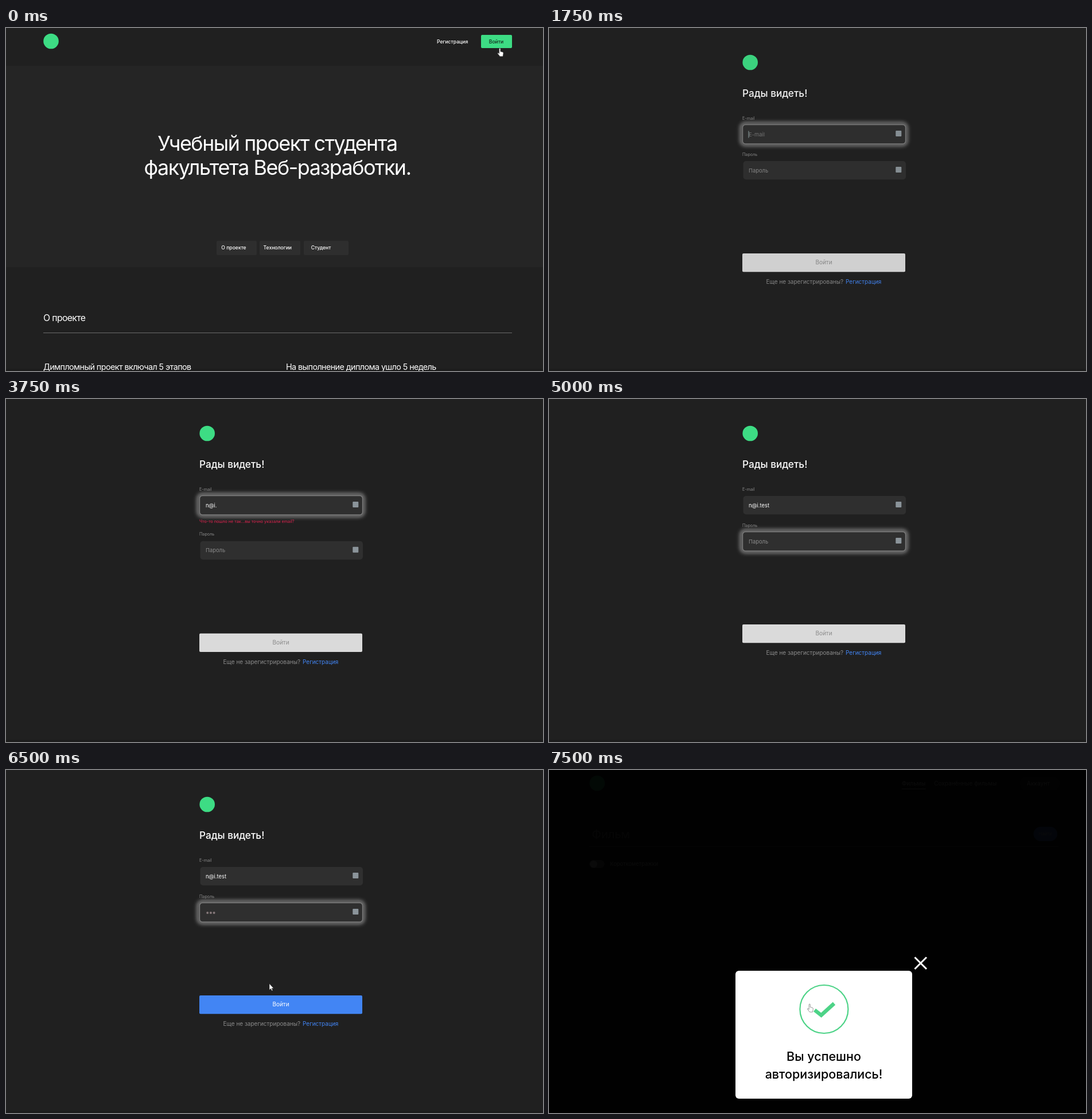
These frames come from a looping animation (936x598 px, 8 s). An HTML page:

```html
<!DOCTYPE html>
<html lang="ru">
<head>
<meta charset="utf-8">
<title>Вход на сайт</title>
<style>
  html, body { margin: 0; width: 100%; height: 100%; overflow: hidden; background: #202020; }
  svg { display: block; width: 936px; height: 598px; }
  text { font-family: Inter, Roboto, sans-serif; fill: #fff; white-space: pre; }
  .mid { text-anchor: middle; }
  .medium { font-weight: 500; }
  .tight { letter-spacing: -.04em; }
  .small { font-size: 8.6px; font-weight: 500; }
  .hero { font-size: 35.85px; }
  .label { font-size: 7.2px; fill: #8b8b8b; }
  .input { font-size: 9.4px; }
  .body { font-size: 10px; }
  .grey { fill: #8b8b8b; }
  .blue { fill: #4285f4; }
  .green { fill: #3ddc84; }
  .field { fill: #2f2f2f; }
  .icon { fill: #8b949a; }
</style>
</head>
<body>
<svg viewBox="0 0 936 598" xmlns="http://www.w3.org/2000/svg">
  <defs>
    <filter id="blur" x="-10%" y="-60%" width="120%" height="220%"><feGaussianBlur stdDeviation="3"/></filter>
  </defs>
  <rect width="936" height="598" fill="#202020"/>
  <rect y="594" width="936" height="4" fill="#1c1c1c"/>

  <g id="landing">
    <rect y="66" width="936" height="351" fill="#252525"/>
    <circle class="green" cx="78.5" cy="23" r="13.3"/>
    <text class="small" x="751" y="26.5">Регистрация</text>
    <rect class="green" x="828" y="12" width="54" height="23" rx="2"/>
    <text class="small mid" x="854.5" y="26.5" style="fill:#14281c">Войти</text>
    <text class="hero tight mid" x="473" y="214">Учебный проект студента</text>
    <text class="hero tight mid" x="473" y="255.6">факультета Веб-разработки.</text>
    <g fill="#2e2e2e">
      <rect x="367" y="371" width="70" height="25" rx="2"/>
      <rect x="442" y="371" width="71" height="25" rx="2"/>
      <rect x="519" y="371" width="78" height="25" rx="2"/>
    </g>
    <text class="small mid" x="397" y="385.5">О проекте</text>
    <text class="small mid" x="473.3" y="385.5">Технологии</text>
    <text class="small mid" x="549" y="385.5">Студент</text>
    <text class="tight" x="65" y="511.3" font-size="15.8">О проекте</text>
    <rect x="65" y="531" width="817" height="1" fill="#6b6b6b"/>
    <g class="tight" font-size="14.35">
      <text x="65" y="596">Димпломный проект включал 5 этапов</text>
      <text x="488" y="596">На выполнение диплома ушло 5 недель</text>
    </g>
  </g>

  <g id="login">
    <circle class="green" cx="350.7" cy="60" r="13.3"/>
    <text class="medium" x="337" y="120.3" font-size="17.2">Рады видеть!</text>
    <text class="label" x="337" y="159.7">E-mail</text>
    <rect class="field" x="338.5" y="169" width="283.5" height="32.3" rx="5"/>
    <text id="error" class="label medium" x="337" y="215.5" style="fill:#c8234a">Что-то пошло не так...вы точно указали email?</text>
    <g id="lower">
      <text class="label" x="337" y="222.7">Пароль</text>
      <rect class="field" x="338.5" y="232" width="283.5" height="32.3" rx="5"/>
      <rect id="submit" x="337" y="393" width="284" height="32.3" rx="2"/>
      <text id="submitText" class="body mid" x="479" y="412">Войти</text>
      <text class="body grey" x="378.5" y="446.3">Еще не зарегистрированы?</text>
      <text class="body blue" x="517" y="446.3">Регистрация</text>
    </g>
    <g id="focus">
      <rect x="335" y="166.5" width="288" height="37" rx="7" fill="none" stroke="#8c8c8c" stroke-width="5" filter="url(#blur)"/>
      <rect x="337.5" y="168.5" width="284" height="33.5" rx="5" fill="#2f2f2f" stroke="#7d7d7d" stroke-width="1.3"/>
    </g>
    <text id="email" class="input" x="348" y="188.7"></text>
    <rect class="icon" x="604.3" y="179" width="10" height="10" rx="1"/>
    <rect id="caret" x="347.5" y="179.5" width="1" height="12" fill="#8fa6a6"/>
    <g id="passwordContent">
      <text id="password" class="input grey" x="348" y="251.7">Пароль</text>
      <g id="dots" fill="#85787a"></g>
      <rect class="icon" x="604.3" y="242" width="10" height="10" rx="1"/>
    </g>
  </g>

  <g id="films">
    <circle class="green" cx="84" cy="23" r="13.3"/>
    <text class="body medium" x="615" y="27">Фильмы</text>
    <rect x="615" y="32.3" width="41.5" height="1.3" fill="#fff"/>
    <text class="body" x="671.3" y="27">Сохранённые фильмы</text>
    <rect x="821" y="12" width="69" height="23" rx="11.5" fill="#303030"/>
    <text class="body medium mid" x="853" y="27">Аккаунт</text>
    <text class="grey" x="74.5" y="119.3" font-size="20">Фильм</text>
    <rect class="blue" x="844.5" y="99" width="41.5" height="25" rx="12.5"/>
    <text class="mid" x="865" y="114.2" font-size="7.9">Найти</text>
    <rect x="70" y="133" width="818" height="1" fill="#757575"/>
    <rect x="70.5" y="157" width="26" height="14" rx="7" fill="#808080"/>
    <circle cx="77.7" cy="164" r="6.3" fill="#fff"/>
    <text x="106.5" y="167.3" font-size="9.3">Короткометражки</text>
  </g>

  <g id="popup">
    <rect width="936" height="598" fill="#000" fill-opacity=".96"/>
    <rect x="325" y="350" width="308" height="223" rx="6" fill="#fff"/>
    <path d="M637.5 326.5l20.5 20.5m0-20.5l-20.5 20.5" stroke="#fff" stroke-width="3"/>
    <g fill="none" stroke="#4dd387">
      <circle cx="479.4" cy="417" r="42" stroke-width="2.2"/>
      <path d="M463 418.5l11.5 9 22.5-20.5" stroke-width="6.5"/>
    </g>
    <g class="medium mid" font-size="21.5">
      <text x="479" y="506.5" style="fill:#000">Вы успешно</text>
      <text x="479" y="538.3" style="fill:#000">авторизировались!</text>
    </g>
  </g>

  <path id="hand" fill="#fff" stroke="#555" stroke-width=".6" d="M3.2 1c0-1.3 2.1-1.3 2.1 0V5.4L9 6.4Q10.6 6.9 10.4 8.5L9.4 14H4.4L.7 9.2Q0 7.6 1.6 8L3.2 9.3Z"/>
  <path id="arrow" fill="#fff" stroke="#111" stroke-width=".5" d="M0 0V11L2.5 8.8 4.3 12.5 6 11.7 4.3 8.2 7.5 8Z"/>
</svg>
<script>
  const LOOP = 8000, TICK = 250;
  const EMAIL = 'n@i.test';
  const $ = id => document.getElementById(id);
  const fade = (id, value) => {
    $(id).style.opacity = value;
    $(id).style.display = value > 0 ? '' : 'none';
  };
  const show = (id, visible) => fade(id, visible ? 1 : 0);
  const move = (id, x, y) => $(id).setAttribute('transform', `translate(${x} ${y})`);
  // Value of the last [time, value] step that has begun.
  const step = (t, steps) => steps.reduce((value, [start, next]) => t >= start ? next : value, 0);

  function render(t) {
    fade('landing', step(t, [[0, 1], [250, .4], [750, 0]]));
    fade('login', step(t, [[1250, .6], [1750, .95], [2250, 1], [7250, 0]]));
    show('films', t >= 7250);
    fade('popup', step(t, [[7250, .2], [7500, 1]]));

    const typed = t < 2500 ? 0 : Math.max(1, Math.min(EMAIL.length, Math.floor((t - 3000) / TICK) + 1));
    $('email').textContent = typed ? EMAIL.slice(0, typed) : 'E-mail';
    $('email').style.fill = typed ? '#fff' : '#777';
    show('caret', t >= 1750 && t < 2250);

    const invalid = t >= 2500 && t < 4750;
    const shift = invalid ? 15.7 : 0;
    show('error', invalid);
    move('lower', 0, shift);
    move('passwordContent', 0, shift);

    show('focus', t >= 1750);
    move('focus', 0, t >= 5000 ? 63 : 0);

    const dots = step(t, [[5250, 1], [5500, 2], [6000, 3]]);
    show('password', !dots);
    $('dots').innerHTML = Array.from({ length: dots }, (_, i) =>
      `<circle cx="${351.2 + i * 5.7}" cy="249" r="2"/>`).join('');

    const ready = dots === 3;
    $('submit').style.fill = ready ? '#4285f4' : '#dadada';
    $('submitText').style.fill = ready ? '#fff' : '#8b8b8b';

    show('hand', t < 1250 || t >= 7000);
    if (t >= 7000) move('hand', 450, 408);
    else move('hand', 856.5, t < 250 ? 35.5 : 29.5);
    show('arrow', t >= 6500 && t < 7000);
    move('arrow', 459, 372.5);
  }

  const origin = performance.now();
  let last = -1;
  function frame() {
    const elapsed = (performance.now() - origin) % LOOP;
    const t = Math.floor(elapsed / TICK) * TICK;
    if (t !== last) render(last = t);
    requestAnimationFrame(frame);
  }
  frame();
</script>
</body>
</html>
```
